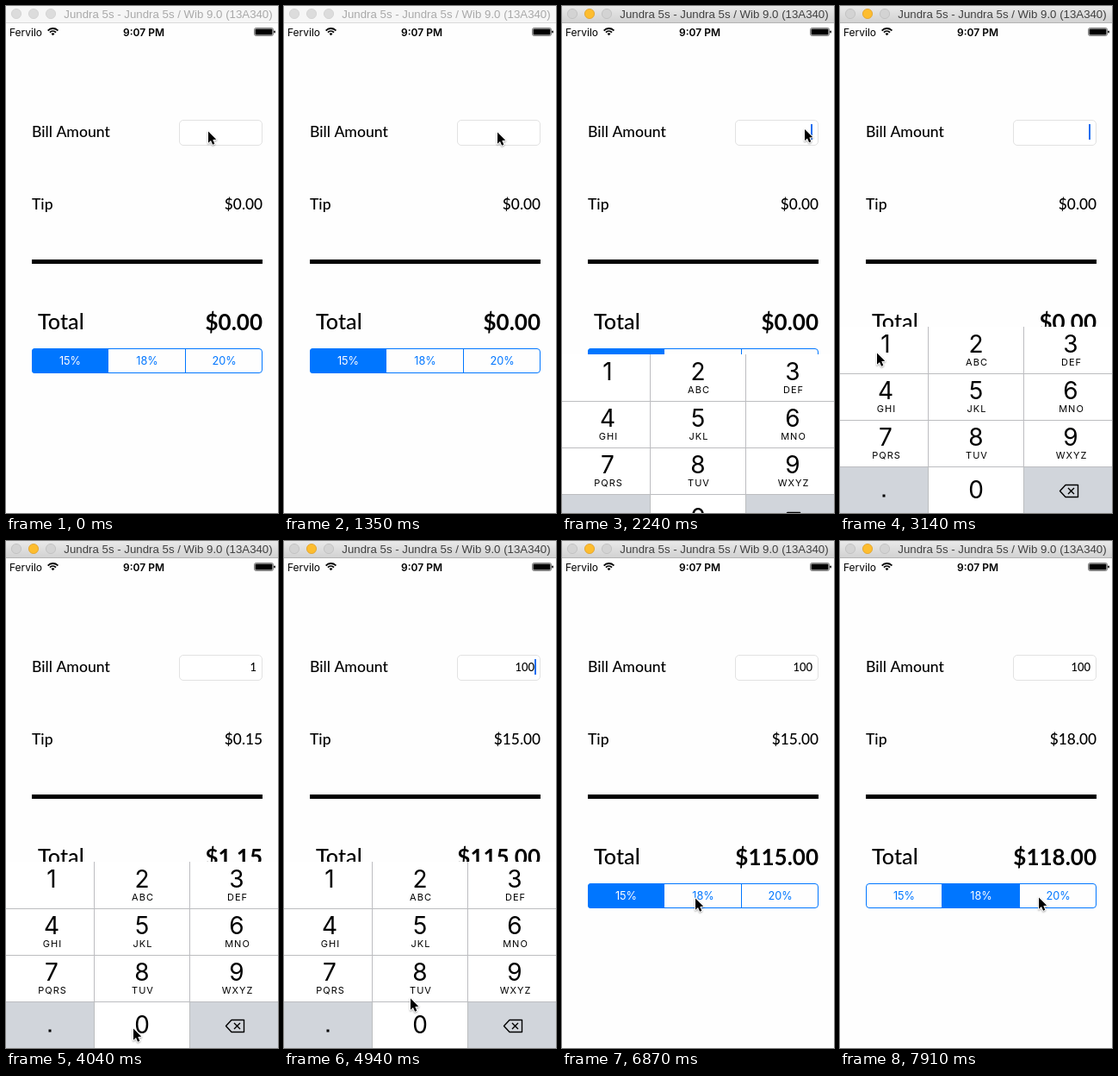
An HTML page with a canvas that plays this animation: 316 px wide and 588 px high, repeating every 8 s.

```html
<!DOCTYPE html>
<html lang="en">
<head>
<meta charset="utf-8">
<title>Tip calculator</title>
<style>
html, body { margin: 0; width: 100%; height: 100%; overflow: hidden; background: #fefefe; }
canvas { display: block; width: 316px; height: 588px; }
</style>
</head>
<body>
<canvas id="stage"></canvas>
<script>
const W = 316, H = 588, LOOP = 8000, STEP = 149.15;
const BLUE = '#0076ff', GREY = '#d1d5db', PAPER = '#fefefe';
const LABEL = 'Lato, sans-serif', UI = 'Inter, sans-serif';
const KEYBOARD = 216, ROW = 54;
const COLS = [[0, 102, 53], [103, 110, 158], [214, 102, 268]];
const LETTERS = ['', 'ABC', 'DEF', 'GHI', 'JKL', 'MNO', 'PQRS', 'TUV', 'WXYZ'];

// Pointer path: step, x, y
const PATH = [
  [8, 235, 145], [9, 248, 146], [10, 270, 145], [11, 282, 142.5], [14, 282, 142.5],
  [15, 272, 165], [17, 190, 265], [19, 80, 375], [21, 43, 402], [23, 43, 402],
  [25, 90, 490], [27, 148, 565], [32, 148, 565], [33, 147, 530], [35, 141, 330],
  [37, 139, 208], [40, 139, 208], [41, 141, 225], [43, 150, 330], [45, 155, 405],
  [46, 155, 414], [51, 155, 414], [52, 190, 415], [53, 231, 413]
];
// Steps during which the caret is lit
const CARET = [[13, 15], [19, 23], [28, 29], [33, 35]];

const canvas = document.getElementById('stage');
const scale = window.devicePixelRatio || 1;
canvas.width = W * scale;
canvas.height = H * scale;
const g = canvas.getContext('2d');

function rect(x, y, w, h, color) {
  g.fillStyle = color;
  g.fillRect(x, y, w, h);
}

function text(str, x, y, font, align = 'left', color = '#000', spacing = 0) {
  g.font = font;
  g.textAlign = align;
  g.fillStyle = color;
  g.letterSpacing = spacing + 'px';
  g.fillText(str, x, y);
}

function box(x, y, w, h, r) {
  g.beginPath();
  g.roundRect(x, y, w, h, r);
}

function poly(points) {
  g.beginPath();
  points.forEach(([x, y]) => g.lineTo(x, y));
  g.closePath();
}

function stroke(color, width) {
  g.strokeStyle = color;
  g.lineWidth = width;
  g.stroke();
}

function pointerAt(n) {
  if (n <= PATH[0][0]) return PATH[0].slice(1);
  for (let i = 1; i < PATH.length; i++) {
    const [n0, x0, y0] = PATH[i - 1], [n1, x1, y1] = PATH[i];
    if (n <= n1) {
      const k = (n - n0) / (n1 - n0);
      return [x0 + (x1 - x0) * k, y0 + (y1 - y0) * k];
    }
  }
  return PATH[PATH.length - 1].slice(1);
}

// Critically damped spring from 0 to 1
function spring(n) {
  const u = Math.max(0, n) * 2.28;
  return 1 - (1 + u) * Math.exp(-u);
}

function keyboardTop(n) {
  if (n >= 41) return H;
  return Math.round(H - KEYBOARD * (spring(n - 12.506) - spring(n - 37.693)));
}

function billAt(n) {
  return n < 23 ? '' : n < 29 ? '1' : n < 30 ? '10' : '100';
}

function titleBar(active) {
  const fill = g.createLinearGradient(0, 0, 0, 19);
  fill.addColorStop(0, active ? '#e9e9e9' : '#f6f6f6');
  fill.addColorStop(1, active ? '#d2d2d2' : '#f6f6f6');
  rect(0, 0, W, 19, fill);
  rect(0, 19, W, 1, active ? '#b4b4b4' : '#dadada');
  [12, 32, 52].forEach((x, i) => {
    const lit = active && i === 1;
    g.beginPath();
    g.arc(x, 9, 5.6, 0, Math.PI * 2);
    g.fillStyle = lit ? '#fdbd2f' : active ? '#d3d3d3' : '#dcdcdc';
    g.fill();
    stroke(lit ? '#e0a028' : active ? '#bebebe' : '#d0d0d0', 0.8);
  });
  text('Jundra 5s - Jundra 5s / Wib 9.0 (13A340)', 188.5, 14,
    '13.25px "Liberation Sans", sans-serif', 'center', active ? '#404040' : '#a9a9a9');
}

function statusBar() {
  text('Fervilo', 4, 34.5, '12px ' + UI);
  text('9:07 PM', 160, 34.5, '600 12px ' + UI, 'center');
  [8, 4.8].forEach(r => {
    g.beginPath();
    g.arc(54.5, 34, r, -Math.PI * 0.76, -Math.PI * 0.24);
    stroke('#000', 1.8);
  });
  g.beginPath();
  g.moveTo(54.5, 34.2);
  g.arc(54.5, 34, 2.6, -Math.PI * 0.76, -Math.PI * 0.24);
  g.fillStyle = '#000';
  g.fill();
  box(288.5, 25.5, 22, 9, 2);
  stroke('#000', 0.5);
  box(289.5, 26.5, 20, 7, 1);
  g.fill();
  box(311.3, 28.4, 1.5, 3.2, 0.8);
  g.fill();
}

function segments(chosen, pressed) {
  const edges = [30, 118.5, 208.5, 298];
  g.save();
  box(30, 397, 268, 29, 3.5);
  g.clip();
  ['15%', '18%', '20%'].forEach((name, i) => {
    const x = edges[i], w = edges[i + 1] - x;
    const on = i === chosen;
    if (on || i === pressed) rect(x, 397, w, 29, on ? BLUE : '#d9eaff');
    text(name, [74.5, 164, 253.5][i], 416, '12.7px ' + UI, 'center', on ? '#fff' : BLUE);
  });
  g.restore();
  rect(118, 397, 1, 29, BLUE);
  rect(208, 397, 1, 29, BLUE);
  box(30.5, 397.5, 267, 28, 3.5);
  stroke(BLUE, 1);
}

function form(n) {
  const bill = billAt(n);
  const rate = n >= 49 ? 18 : 15;
  const tip = bill * rate / 100;
  const money = v => '$' + v.toFixed(2);

  text('Bill Amount', 30, 152, '500 17.6px ' + LABEL);
  box(201.5, 132.5, 96, 29, 4.5);
  g.fillStyle = '#fff';
  g.fill();
  stroke('#e2e2e2', 1);
  text(bill, 291, 151, '500 13px ' + LABEL, 'right');
  if (CARET.some(([a, b]) => n >= a && n <= b)) rect(289 + (bill ? 2 : 0), 137, 2, 18, '#1a6ef0');

  text('Tip', 30, 236, '500 17.6px ' + LABEL);
  text(money(tip), 298, 236, '500 17.3px ' + LABEL, 'right');
  rect(30, 294, 268, 5, '#000');
  text('Total', 37, 375, '500 25.2px ' + LABEL);
  text(money(+bill + tip), 298, 375.5, 'bold 26px ' + LABEL, 'right');
  segments(n >= 49 ? 1 : 0, n === 48 ? 1 : -1);
}

function deleteIcon(y) {
  g.lineJoin = 'round';
  poly([[255.5, y], [262, y - 7], [276.5, y - 7], [276.5, y + 7], [262, y + 7]]);
  stroke('#000', 1.4);
  g.beginPath();
  g.moveTo(265, y - 3.5);
  g.lineTo(272, y + 3.5);
  g.moveTo(272, y - 3.5);
  g.lineTo(265, y + 3.5);
  stroke('#000', 1.4);
}

function keyboard(n, top) {
  if (top >= H) return;
  const last = top + 3 * ROW;
  rect(0, top, W, KEYBOARD, '#fff');
  rect(0, last, 102, ROW, GREY);
  rect(214, last, 102, ROW, GREY);
  if (n === 22) rect(0, top, 102, ROW, GREY);
  if (n === 28 || n === 29) rect(103, last, 110, ROW, GREY);
  for (let i = 1; i < 4; i++) rect(0, top + i * ROW, W, 1, '#bcbdc0');
  rect(102, top, 1, KEYBOARD, '#bcbdc0');
  rect(213, top, 1, KEYBOARD, '#bcbdc0');

  const digit = '28px ' + UI;
  LETTERS.forEach((letters, i) => {
    const x = COLS[i % 3][2], y = top + Math.floor(i / 3) * ROW;
    text(String(i + 1), x, y + 30, digit, 'center');
    text(letters, x + 1, y + 45, '11px ' + UI, 'center', '#000', 1);
  });
  text('0', COLS[1][2], last + 37, digit, 'center');
  rect(49.5, last + 32.5, 3, 3, '#000');
  deleteIcon(last + 28.5);
}

function pointer([x, y]) {
  g.save();
  g.translate(x - 0.5, y - 0.5);
  g.lineJoin = 'round';
  poly([[0.5, 1], [0.5, 14.2], [3.5, 11.4], [5.6, 16.2], [7.8, 15.2], [5.8, 10.6], [9.8, 10.2]]);
  g.shadowColor = 'rgba(0,0,0,.35)';
  g.shadowBlur = 2 * scale;
  g.shadowOffsetY = scale;
  stroke('#fff', 2);
  g.shadowColor = 'transparent';
  g.fillStyle = '#000';
  g.fill();
  g.restore();
}

function draw(t) {
  const n = Math.max(0, Math.floor((t - 5) / STEP));
  g.setTransform(scale, 0, 0, scale, 0, 0);
  rect(0, 0, W, H, PAPER);
  titleBar(n >= 13);
  statusBar();
  form(n);
  keyboard(n, keyboardTop(n));
  pointer(pointerAt(n));
}

const start = performance.now();
function tick() {
  draw((performance.now() - start) % LOOP);
  requestAnimationFrame(tick);
}
tick();
</script>
</body>
</html>
```
